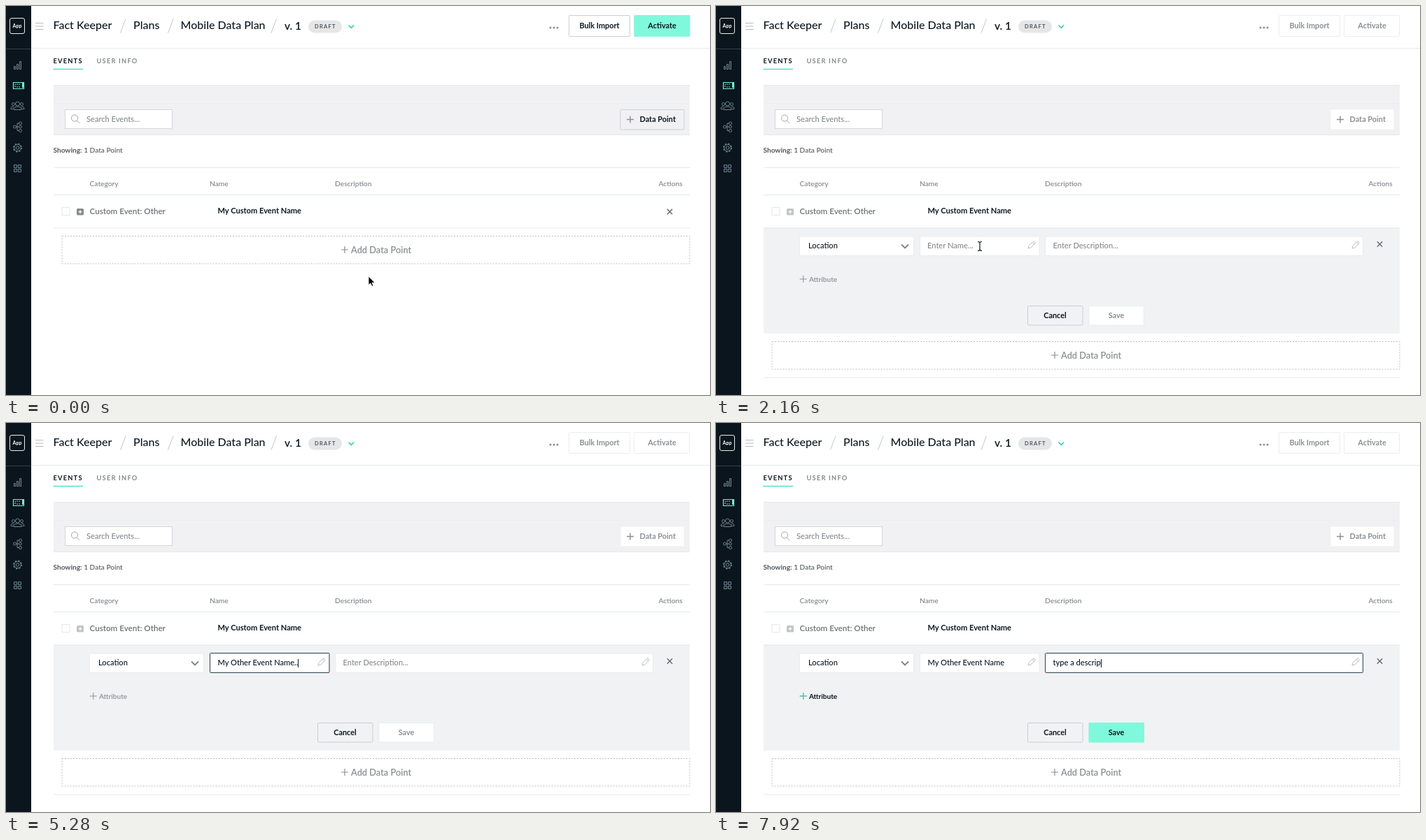
These frames come from a looping animation (1006 by 557 pixels, 8000 ms). An HTML page:

```html
<!DOCTYPE html>
<html lang="en">
<head>
<meta charset="utf-8">
<title>Data plan editor</title>
<style>
  html, body { margin: 0; width: 100%; height: 100%; overflow: hidden; background: #fff; }
  svg { display: block; width: 1006px; height: 557px; }
  text { font: 500 11.1px Lato, "Open Sans", sans-serif; fill: #0b1820; white-space: pre; }
  .crumb { font-size: 16px; }
  .tab { font-size: 9.3px; font-weight: 700; letter-spacing: 1.2px; }
  .head { font-size: 10.25px; fill: #7d8286; }
  .btn { font-size: 10.9px; font-weight: 700; }
  .mid { text-anchor: middle; }
  .attr { font-size: 10.1px; font-weight: 600; }
  .hint { fill: #85898d; }
  .off { fill: #8c9094; }
  .line { stroke: #e6e8ea; }
  .box { fill: #fff; stroke: #eaecee; }
  .frame { fill: none; stroke: #cbcfd2; }
  .focus { fill: none; stroke: #2a4351; }
  .stroke { fill: none; stroke: #8b9094; }
  .nav { fill: none; stroke: #6d828f; }
  .nav.on { stroke: #6ff0d3; }
  #add { stroke: #8a8e92; fill: #8a8e92; }
  #add rect { fill: none; stroke: #bbbec1; stroke-dasharray: 2 2; }
  #add text { font-size: 12.8px; font-weight: 600; fill: inherit; stroke: none; }
  #add.hover, #add.hover rect { stroke: #3c464d; }
  #add.hover { fill: #3c464d; }
</style>
</head>
<body>
<svg viewBox="0 0 1006 557">
  <defs>
    <path id="plus" d="M-5 0H5M0-5V5"/>
    <path id="cross" d="M-3.7-3.7 3.7 3.7M3.7-3.7-3.7 3.7" fill="none" stroke="#62686d" stroke-width="1.4"/>
    <path id="pencil" d="M-5 5l1-3.6 6-6q1-1 2 0l.7.7q1 1 0 2l-6 6zM1-3.5l2.6 2.6" fill="none" stroke="#b9bdc0"/>
    <path id="bar" d="M-3-6.5Q0-6.5 0-4.5Q0-6.5 3-6.5M0-5V5M-3 6.5Q0 6.5 0 4.5Q0 6.5 3 6.5" fill="none"/>
  </defs>

  <!-- sidebar -->
  <rect width="36" height="557" fill="#0a151d"/>
  <path d="M0 61.5H36" stroke="#35424a"/>
  <rect x="5.5" y="17.5" width="21" height="22" rx="2.5" fill="none" stroke="#e9eef0"/>
  <text class="mid" x="16" y="30.5" style="font-size:7px;font-weight:700;fill:#fff">App</text>
  <g class="nav">
    <path d="M11.5 86.5h2v4h-2zM15.5 83.5h2v7h-2zM19.5 79.5h2v11h-2z"/>
    <circle cx="16.5" cy="140" r="3"/>
    <path d="M11 148.5v-1q0-3.5 5.5-3.5t5.5 3.5v1z"/>
    <circle cx="10.5" cy="140.5" r="2"/><circle cx="22.5" cy="140.5" r="2"/>
    <path d="M10.5 147.5H7v-1q0-2.5 4-2.5M22.5 147.5H26v-1q0-2.5-4-2.5"/>
    <circle cx="12.5" cy="173" r="2"/><circle cx="20.5" cy="168" r="2"/>
    <circle cx="20.5" cy="173" r="1.8"/><circle cx="20.5" cy="178.5" r="2"/>
    <path d="M14.5 173h4M16 173v-5h2.5M16 173v5.5h2.5"/>
    <circle cx="16.5" cy="203" r="2.3"/>
    <circle cx="16.5" cy="203" r="4.8"/>
    <circle cx="16.5" cy="203" r="5.7" stroke-width="1.6" stroke-dasharray="2.24"/>
    <path d="M11.5 227.5h4v4h-4zM17.5 227.5h4v4h-4zM11.5 233.5h4v4h-4zM17.5 233.5h4v4h-4z"/>
  </g>
  <g class="nav on">
    <path d="M10.5 109.5h15v9h-15z" stroke-width="1.2"/>
    <path d="M13 116v-4h4M18 112h2M15 116h5" stroke-dasharray="2 1"/>
    <path d="M24.5 109v8" stroke-width="3"/>
  </g>

  <!-- header -->
  <path class="line" d="M36 60.5H1006"/>
  <path d="M42 24.5H53.5M42 29H53.5M42 33.5H53.5" stroke="#b7bbbe"/>
  <text class="crumb" x="67.5" y="33">Fact Keeper</text>
  <text class="crumb" x="182" y="33">Plans</text>
  <text class="crumb" x="249.5" y="33">Mobile Data Plan</text>
  <path d="M163.5 38.5l7.5-20M231.5 38.5l7.5-20M379 38.5l7.5-20" stroke="#c2c6c8"/>
  <text x="398" y="33.5" style="font-size:15.5px;font-weight:600">v. 1</text>
  <rect x="432" y="20.5" width="48" height="18" rx="9" fill="#e4e6e8"/>
  <text class="tab" x="441" y="32.3" style="font-size:7.6px;fill:#52595e">DRAFT</text>
  <path d="M489.5 27.5l3.8 3.8 3.8-3.8" fill="none" stroke="#2fd0b3" stroke-width="1.7"/>
  <g fill="#878c90"><circle cx="778" cy="31" r="1.5"/><circle cx="783" cy="31" r="1.5"/><circle cx="788" cy="31" r="1.5"/></g>
  <rect class="box" x="804.5" y="13.5" width="87" height="30" rx="1"/>
  <rect class="box" x="897.5" y="13.5" width="79" height="30" rx="1"/>
  <g id="topOn">
    <rect class="frame" x="804.5" y="13.5" width="87" height="30" rx="1"/>
    <rect x="897.5" y="13" width="80" height="31" rx="1" fill="#80f8dc"/>
  </g>
  <text class="btn mid lock" x="848" y="32">Bulk Import</text>
  <text class="btn mid lock" x="937.5" y="32">Activate</text>

  <text class="tab" x="67.5" y="82">EVENTS</text>
  <text class="tab hint" x="129.5" y="82">USER INFO</text>
  <path d="M67.5 90.5H110" stroke="#4fe3c7" stroke-width="1.5"/>

  <!-- toolbar -->
  <rect x="68" y="114" width="909" height="71" fill="#f1f1f3"/>
  <path d="M68 139.5H977" stroke="#ebecee"/>
  <path d="M68 113.5H977M68 184.5H977" stroke="#e6e7e9"/>
  <rect x="84.5" y="148.5" width="153" height="27" fill="#fff" stroke="#d3d6d8"/>
  <g class="stroke" style="stroke:#a2a6a9"><circle cx="98" cy="160.5" r="4.6"/><path d="M101.3 164l4 4"/></g>
  <text class="hint" x="115" y="166">Search Events...</text>
  <rect id="newOff" x="878.5" y="148.5" width="90" height="28" fill="#fff" rx="1"/>
  <rect id="newOn" class="frame" x="878" y="148.5" width="91" height="28.5" rx="1"/>
  <use href="#plus" x="892" y="162.5" class="stroke" stroke-width="1.4"/>
  <text class="btn lock" x="905.5" y="166">Data Point</text>

  <text x="67.5" y="210" style="font-size:10.1px;fill:#53595d"><tspan font-weight="700">Showing:</tspan> 1 Data Point</text>

  <!-- table -->
  <path class="line" d="M68 231.5H977M68 270.5H977M68 318H977"/>
  <text class="head" x="119.5" y="257.5">Category</text>
  <text class="head" x="291" y="257.5">Name</text>
  <text class="head" x="470" y="257.5">Description</text>
  <text class="head" x="932.5" y="257.5">Actions</text>
  <rect x="80" y="288.5" width="11" height="11" fill="#fff" stroke="#e5e7e9"/>
  <g id="expand"><rect x="101" y="290" width="10" height="9.5" rx="1.5" fill="#85898d"/><path d="M103.5 294.7h5M106 292.2v5" stroke="#fff" stroke-width="1.3"/></g>
  <text x="119.5" y="298" style="font-size:11.65px;font-weight:600;fill:#6c7175">Custom Event: Other</text>
  <text class="btn" x="302.5" y="297" style="font-size:11.1px">My Custom Event Name</text>
  <use id="rowX" href="#cross" x="948.5" y="294.5"/>

  <!-- new data point form -->
  <g id="form">
    <rect x="68" y="318" width="909" height="151" fill="#f1f2f4"/>
    <path class="line" d="M68 318H977M68 532H977"/>
    <rect class="box" x="119.5" y="330" width="163" height="27.5"/>
    <text id="category" x="132" y="346.5"></text>
    <path d="M265 341.5l5 5 5-5" fill="none" stroke="#7c8185" stroke-width="1.8"/>
    <rect class="box" x="291.5" y="330" width="170.5" height="27.5"/>
    <rect class="box" x="470.5" y="330" width="454" height="27.5"/>
    <use href="#pencil" x="451" y="342"/>
    <use href="#pencil" x="914" y="342"/>
    <text id="nameHint" class="hint" x="302" y="347">Enter Name...</text>
    <text id="descHint" class="hint" x="481.5" y="347">Enter Description...</text>
    <rect id="nameFocus" class="focus" x="291.5" y="329.5" width="170.5" height="28" rx="1"/>
    <rect id="descFocus" class="focus" x="470.5" y="329.5" width="454" height="28" rx="1"/>
    <text id="name" x="302.5" y="347"></text>
    <text id="desc" x="481.5" y="347"></text>
    <path id="caret" d="M.5 338V350" stroke="#0b1820"/>
    <use href="#cross" x="948.5" y="341"/>
    <use href="#plus" x="124.7" y="391" class="stroke"/>
    <text class="attr off" x="133" y="395">Attribute</text>
    <rect class="frame" x="445.5" y="429.5" width="78.5" height="27.5" rx="1.5"/>
    <text class="btn mid" x="484.5" y="447">Cancel</text>
    <rect class="box" x="533" y="429.5" width="78.5" height="27.5" rx="1"/>
    <text class="btn mid off" x="572" y="447">Save</text>
    <g id="ready">
      <rect x="532.5" y="429" width="79.5" height="28.5" rx="1" fill="#80f8dc"/>
      <text class="btn mid" x="572" y="447">Save</text>
      <use href="#plus" x="124.7" y="391" stroke="#2fd9ba" stroke-width="1.2"/>
      <text class="attr" x="133" y="395">Attribute</text>
    </g>
  </g>

  <g id="add">
    <rect x="80" y="329.5" width="897" height="39.5"/>
    <use href="#plus" x="484" y="349" stroke-width="1.2"/>
    <text x="493" y="353.5">Add Data Point</text>
  </g>

  <g id="menu">
    <rect x="112" y="370" width="185" height="200" fill="#fff" stroke="#e3e5e7"/>
    <rect id="menuRow" x="112.5" y="418" width="184" height="48" fill="#e9ebed"/>
    <text x="132" y="398">Navigation</text>
    <text x="132" y="446">Location</text>
    <text x="132" y="494">Search</text>
    <text x="132" y="542">Transaction</text>
  </g>

  <g id="pointer">
    <path id="arrow" d="M0 0V12.5L2.9 9.9 4.9 14.3 6.9 13.4 5 9.2H9z" stroke="#fff" stroke-width=".8"/>
    <g id="ibeam">
      <use href="#bar" stroke="#fff" stroke-width="2.6"/>
      <use href="#bar" stroke="#0b1820" stroke-width="1.2"/>
    </g>
    <path id="hand" d="M-1 7V-5q0-1.500 1.200-1.500t1.200 1.500V0q2-.8 2.400.8q2-.5 2.300 1q1.800-.3 1.800 1.400V6l-1.500 4H-.5L-4.500 4.500q-.8-1.500.6-1.900T-1 4.500" fill="#fff" stroke="#0b1820"/>
  </g>
</svg>
<script>
const LOOP = 8000;
const NAME = 'My Other Event Name..';
const DESC = 'type a descrip';

// Each step: time, pointer shape, x, y
const pointer = [
  [0, 'arrow', 518, 387], [120, 'hand', 525, 367], [240, 'hand', 530, 357],
  [720, 'ibeam', 530, 357], [840, 'ibeam', 497, 352], [960, 'ibeam', 400, 346],
  [1080, 'ibeam', 312, 344], [1200, 'hand', 250, 344], [1320, 'hand', 238, 350],
  [1440, 'hand', 228, 392], [1560, 'hand', 226, 430], [1680, 'hand', 232, 438],
  [1800, 'arrow', 255, 424], [1920, 'arrow', 308, 377], [2040, 'ibeam', 352, 353],
  [2160, 'ibeam', 377, 344], [3600, ''],
  [5760, 'ibeam', 420, 344], [5880, 'ibeam', 458, 343], [6000, 'ibeam', 505, 341],
  [6120, 'ibeam', 533, 339], [6240, 'ibeam', 537, 339], [6720, '']
];

// Time and number of letters typed
const nameKeys = [
  [0, 0], [3600, 1], [3720, 2], [3840, 4], [3960, 5], [4080, 7], [4200, 9], [4320, 11],
  [4440, 12], [4680, 14], [4800, 16], [4920, 17], [5040, 19], [5280, 21], [5520, 20], [5640, 19]
];
const descKeys = [
  [0, 0], [6720, 1], [6840, 2], [6960, 3], [7080, 5], [7200, 7],
  [7440, 8], [7560, 9], [7680, 11], [7800, 12], [7920, 14]
];
const caretKeys = [
  [0, 0], [2280, 1], [2520, 0], [2880, 1], [3120, 0], [3360, 1], [6480, 0], [6720, 1]
];

const $ = id => document.getElementById(id);
const show = (id, on) => { $(id).style.display = on ? '' : 'none'; };
const at = (steps, t) => steps.findLast(s => s[0] <= t);
const locked = document.querySelectorAll('.lock');

function draw(t) {
  const open = t >= 720;
  const inName = t >= 2280 && t < 6240;
  const inDesc = t >= 6240;

  show('form', open);
  for (const id of ['topOn', 'newOn', 'rowX']) show(id, !open);
  show('newOff', open);
  locked.forEach(el => el.classList.toggle('off', open));
  $('expand').style.opacity = open ? 0.5 : 1;
  $('add').setAttribute('transform', `translate(0 ${open ? 151 : 0})`);
  $('add').classList.toggle('hover', t >= 120 && !open);

  show('menu', t >= 1320 && t < 1800);
  show('menuRow', t >= 1560);
  $('category').textContent = t < 1800 ? '-Select Category-' : 'Location';

  show('nameHint', t < 2280);
  show('descHint', !inDesc);
  show('nameFocus', inName);
  show('descFocus', inDesc);
  $('name').textContent = NAME.slice(0, at(nameKeys, t)[1]);
  $('desc').textContent = DESC.slice(0, at(descKeys, t)[1]);
  $('ready').style.opacity = t < 6360 ? 0 : t < 6480 ? 0.5 : 1;

  show('caret', at(caretKeys, t)[1]);
  const field = $(inDesc ? 'desc' : 'name');
  const end = field.textContent ? field.getComputedTextLength() : 0;
  const x = Math.round(field.x.baseVal[0].value + end);
  $('caret').setAttribute('transform', `translate(${x} 0)`);

  const [, shape, px = 0, py = 0] = at(pointer, t);
  for (const id of ['arrow', 'ibeam', 'hand']) show(id, id === shape);
  $('pointer').setAttribute('transform', `translate(${px} ${py})`);
}

function tick() {
  draw(performance.now() % LOOP);
  requestAnimationFrame(tick);
}
tick();
</script>
</body>
</html>
```
